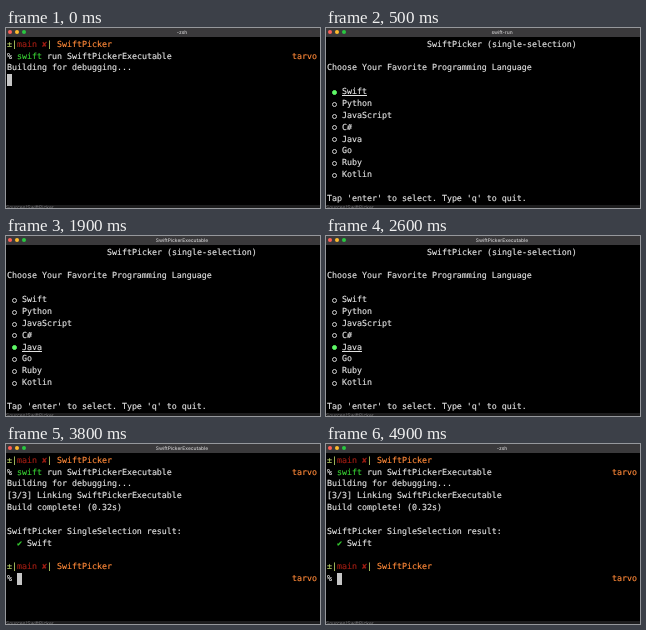
An HTML page that plays this animation: 314x180 px, repeating every 5100 ms.

```html
<!DOCTYPE html>
<html lang="en">
<head>
<meta charset="utf-8">
<title>SwiftPicker</title>
<style>
  html, body { margin: 0; width: 100%; height: 100%; overflow: hidden; background: #000; }
  #stage {
    position: relative; width: 314px; height: 180px; overflow: hidden; background: #000;
    color: #e2e2e2; font: 8.305px/11.85px "DejaVu Sans Mono", monospace;
    text-rendering: geometricPrecision; font-variant-ligatures: none;
  }
  #bar { position: absolute; left: 0; top: 0; width: 314px; height: 9px; background: #3a393b; }
  #bar i { position: absolute; top: 2.3px; width: 4px; height: 4px; border-radius: 50%; }
  #title {
    position: absolute; left: 116px; width: 120px; top: .5px; text-align: center; white-space: nowrap;
    font: 500 4.9px/9px Inter, sans-serif; color: #d0cfd0;
  }
  #foot {
    position: absolute; left: 0; top: 177px; width: 314px; height: 3px; overflow: hidden;
    background: #1d1d1e; color: #77777a; font: 5px/6px Inter, sans-serif; white-space: pre;
  }
  .line { position: absolute; white-space: pre; -webkit-text-stroke: .16px currentColor; }
  .cursor { position: absolute; width: 5px; height: 11.6px; background: #c6c6c6; }
  .dot {
    position: absolute; left: 5.9px; width: 5px; height: 5px; box-sizing: border-box;
    border: .65px solid #d2d2d2; border-radius: 50%;
  }
  .on.dot { background: #5ff967; border-color: #5ff967; }
  .on.line { text-decoration: underline; text-decoration-thickness: .8px; text-underline-offset: 1.4px; }
  .orange { color: #ff8838; }
  .red { color: #a01d13; }
  .green { color: #37cc32; }
  .lime { color: #c3dc6c; }
</style>
</head>
<body>
<div id="stage">
  <div id="bar">
    <i style="left:2.2px;background:#fe5f57"></i>
    <i style="left:9.2px;background:#febc2e"></i>
    <i style="left:16.2px;background:#28c840"></i>
    <div id="title"></div>
  </div>
  <div id="shell"></div>
  <div id="picker"></div>
  <div id="foot">Sources/SwiftPicker</div>
</div>
<script>
const LOOP = 5100, CELL = 5, PITCH = 11.85, TOP = 10.7;
const $ = id => document.getElementById(id);
const [shell, picker, title] = ['shell', 'picker', 'title'].map($);

function place(el, col, row) {
  el.style.left = 1 + col * CELL + 'px';
  el.style.top = TOP + row * PITCH + 'px';
}
function add(parent, cls, html = '') {
  const el = document.createElement('div');
  el.className = cls;
  el.innerHTML = html;
  parent.append(el);
  return el;
}
function text(parent, col, row, html) {
  const el = add(parent, 'line', html);
  place(el, col, row);
  return el;
}
const span = (cls, text) => `<span class="${cls}">${text}</span>`;

function prompt(row) {
  return [
    text(shell, 0, row, span('lime', '±|') + span('red', 'main ✘') + span('lime', '|') + span('orange', ' SwiftPicker')),
    text(shell, 0, row + 1, '%'),
    text(shell, 57, row + 1, span('orange', 'tarvo'))
  ];
}

// Shell screen
prompt(0);
text(shell, 2, 1, span('green', 'swift') + ' run SwiftPickerExecutable');
text(shell, 0, 2, 'Building for debugging...');
const linking = text(shell, 0, 3, '[3/3] Linking SwiftPickerExecutable');
const complete = text(shell, 0, 4, 'Build complete! (0.32s)');
const result = [
  text(shell, 0, 6, 'SwiftPicker SingleSelection result:'),
  text(shell, 2, 7, span('green', '✔') + ' Swift'),
  ...prompt(9)
];
const cursor = add(shell, 'cursor');

// Picker screen
text(picker, 20, 0, 'SwiftPicker (single-selection)');
text(picker, 0, 2, 'Choose Your Favorite Programming Language');
text(picker, 0, 13, "Tap 'enter' to select. Type 'q' to quit.");
const items = ['Swift', 'Python', 'JavaScript', 'C#', 'Java', 'Go', 'Ruby', 'Kotlin'].map((name, i) => {
  const dot = add(picker, 'dot');
  dot.style.top = TOP + (4.5 + i) * PITCH - 2.2 + 'px';
  return [dot, text(picker, 3, 4 + i, name)];
});

// Steps: [start in ms, value]
const titles = [[0, '-zsh'], [200, 'swift-run'], [800, 'SwiftPickerExecutable'], [4300, '-zsh']];
const screens = [[0, 'start'], [100, 'link'], [300, 'built'], [500, 'pick'], [3800, 'done']];
const picks = [[0, 0], [1200, 1], [1600, 2], [1700, 3], [1900, 4], [2000, 5],
  [2500, 4], [2700, 3], [2900, 2], [3100, 1], [3300, 0]];
const cursors = { start: [0, 3], link: [0, 4], built: [0, 5], pick: [0, 5], done: [2, 10] };

const at = (steps, t) => steps.reduce((value, step) => t >= step[0] ? step[1] : value, steps[0][1]);
const show = (el, on) => { el.style.display = on ? 'block' : 'none'; };

function draw(t) {
  const screen = at(screens, t), pick = at(picks, t);
  title.textContent = at(titles, t);
  show(shell, screen !== 'pick');
  show(picker, screen === 'pick');
  show(linking, screen !== 'start');
  show(complete, screen === 'built' || screen === 'done');
  result.forEach(el => show(el, screen === 'done'));
  place(cursor, ...cursors[screen]);
  items.forEach(pair => pair.forEach(el => el.classList.toggle('on', pair === items[pick])));
}

const begin = performance.now();
function tick() {
  draw((performance.now() - begin) % LOOP);
  requestAnimationFrame(tick);
}
tick();
</script>
</body>
</html>
```
